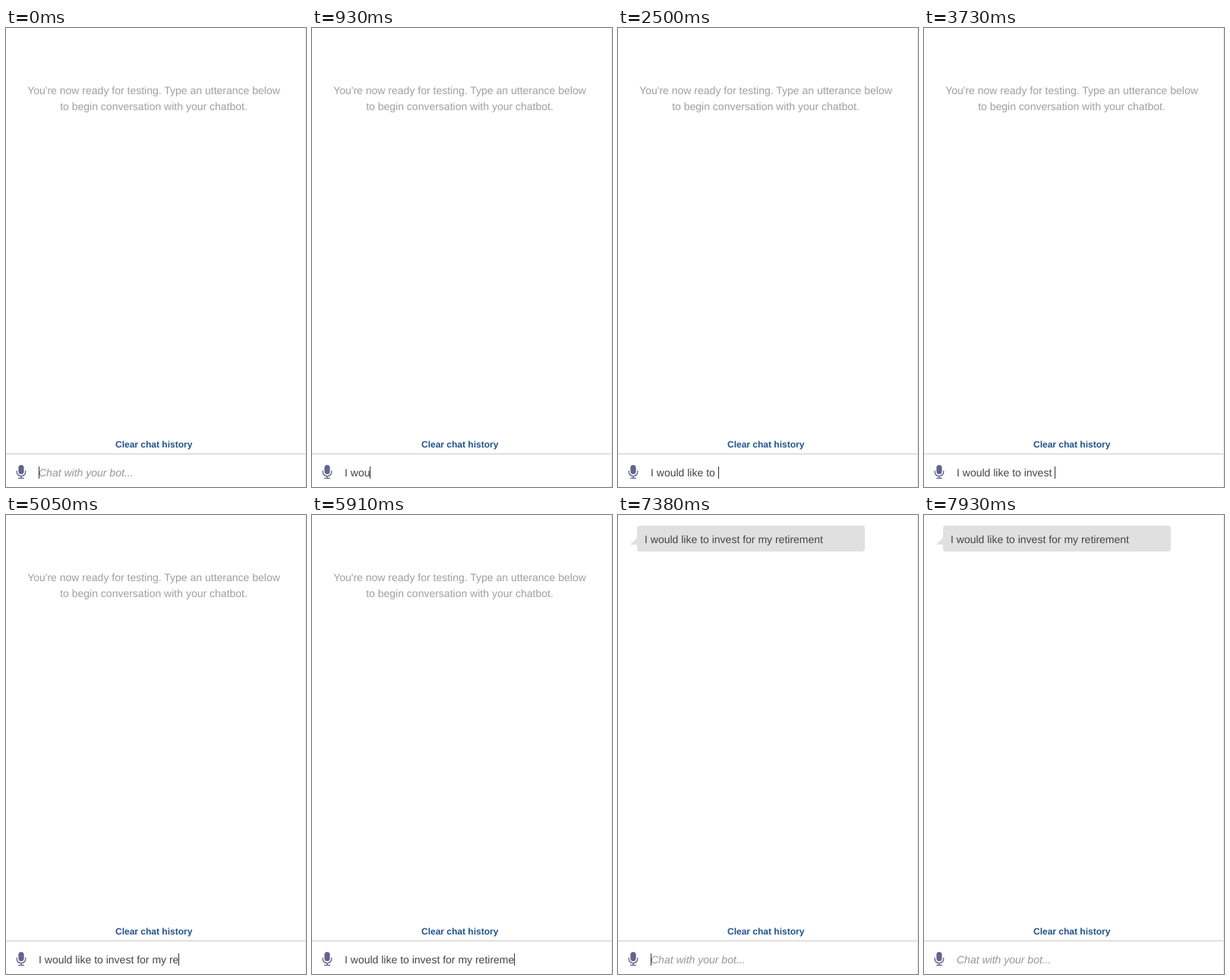
These frames come from a looping animation (395x604 px, 8 s). An HTML page:

```html
<!DOCTYPE html>
<html lang="en">
<head>
<meta charset="utf-8">
<title>Chatbot test</title>
<style>
  html, body { margin: 0; width: 100%; height: 100%; overflow: hidden; background: #fff; }
  #stage {
    position: relative; width: 395px; height: 604px; overflow: hidden;
    font: 14px/16px "Liberation Sans", Arial, sans-serif;
    text-rendering: geometricPrecision; color: #444;
  }
  #stage > * { position: absolute; white-space: pre; }
  .hint { left: 0; width: 389px; text-align: center; color: #9f9f9f; }
  .clear { left: 144px; top: 540px; font-size: 12px; font-weight: bold; color: #22528c; }
  .edge { left: 394px; top: 0; width: 1px; height: 604px; background: #e9e9e9; }
  .rule { left: 0; top: 560px; width: 394px; height: 1px; background: #c8c8c8; }
  .mic { left: 13px; top: 574px; }
  #bubble {
    left: 25px; top: 14px; width: 290px; height: 16px; padding: 10px 0 8px 10px;
    border-radius: 4px; background: #e0e0e0;
  }
  #bubble::before {
    content: ""; position: absolute; left: -9px; top: 16px;
    border: solid transparent; border-width: 9px 0 0 9px;
    border-width: 0 0 9px 9px; border-bottom-color: #e0e0e0;
  }
  .field { left: 43px; top: 577px; }
  #placeholder { font-style: italic; color: #969696; }
  #caret { left: 43px; top: 577px; width: 1px; height: 16px; background: #333; }
</style>
</head>
<body>
<div id="stage">
  <div class="hint line" style="top:74px">You're now ready for testing. Type an utterance below</div>
  <div class="hint line" style="top:95px">to begin conversation with your chatbot.</div>
  <div id="bubble"></div>
  <div class="clear">Clear chat history</div>
  <div class="rule"></div>
  <svg class="mic" width="14" height="20" viewBox="0 0 14 20" fill="none" stroke="#62648f">
    <rect x="3.4" y="1" width="7.2" height="12" rx="3.6" fill="#62648f" stroke="none"/>
    <path d="M1.3 8.4v2.2a5.7 5 0 0 0 11.4 0v-2.2M7 15.6v3" stroke-width="1.4"/>
    <path d="M3.2 18.4h7.6" stroke-width="1.4"/>
  </svg>
  <div id="placeholder" class="field">Chat with your bot...</div>
  <div id="typed" class="field"></div>
  <div id="caret"></div>
  <div class="edge"></div>
</div>
<script>
  const LOOP = 8000, SENT = 7380, LEFT = 43;
  const message = "I would like to invest for my retirement";

  // [characters typed, ms]; strokes between two entries are evenly spaced
  const strokes = [
    [1, 370], [5, 930], [6, 1160], [7, 1240], [8, 1310], [14, 2330],
    [15, 2410], [16, 2500], [17, 2640], [20, 3190], [21, 3500], [23, 3730],
    [24, 3960], [28, 4440], [29, 4670], [32, 5050], [33, 5280], [36, 5590],
    [37, 5760], [40, 6140]
  ];
  const caretOff = [[230, 370], [6680, 7230], [7930, LOOP]];

  const $ = id => document.getElementById(id);
  const typed = $("typed"), caret = $("caret");
  const show = (el, on) => { el.style.visibility = on ? "visible" : "hidden"; };
  const hints = document.querySelectorAll(".hint");
  $("bubble").textContent = message;

  function typedCount(t) {
    if (t >= SENT || t < strokes[0][1]) return 0;
    const i = strokes.findIndex(s => s[1] > t);
    if (i < 0) return message.length;
    const [n0, t0] = strokes[i - 1], [n1, t1] = strokes[i];
    return n0 + Math.floor((n1 - n0) * (t - t0) / (t1 - t0) + 1e-6);
  }

  function draw(t) {
    const n = typedCount(t), sent = t >= SENT;
    typed.textContent = message.slice(0, n);
    show($("placeholder"), n === 0);
    show($("bubble"), sent);
    hints.forEach(h => show(h, !sent));
    show(caret, !caretOff.some(([a, b]) => t >= a && t < b));
    caret.style.left = Math.round(LEFT + typed.getBoundingClientRect().width) + "px";
  }

  function tick() {
    draw(performance.now() % LOOP);
    requestAnimationFrame(tick);
  }
  tick();
</script>
</body>
</html>
```
